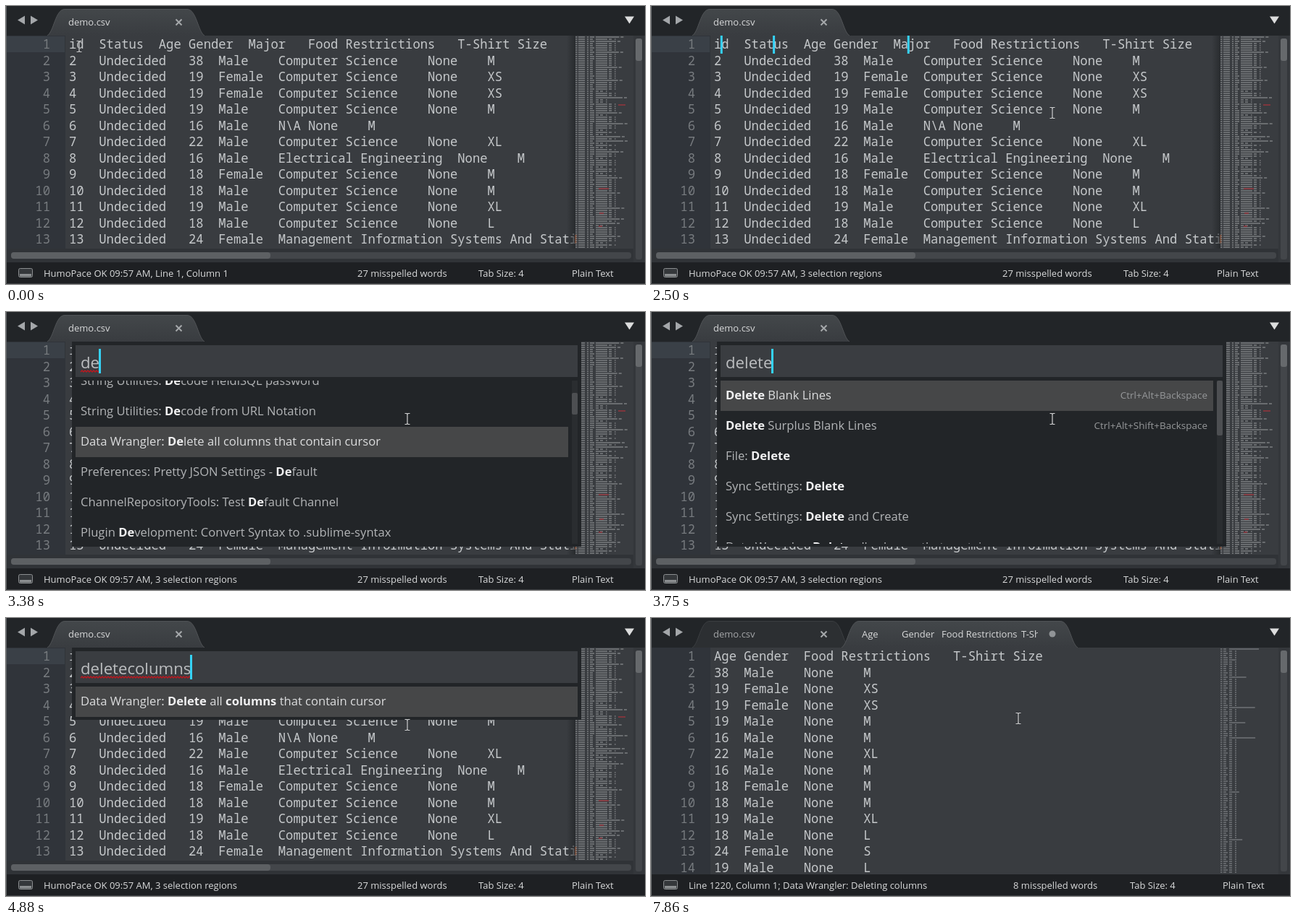
Animation of 882 by 385 pixels, one loop 7.99 s. Source, as an HTML page:

```html
<!DOCTYPE html>
<html lang="en">
<head>
<meta charset="utf-8">
<title>Deleting columns</title>
<style>
html, body { margin: 0; width: 100%; height: 100%; overflow: hidden; background: #1e2023; }
svg { display: block; width: 882px; height: 385px; }
text { white-space: pre; font: 13px "Open Sans", "Noto Sans", sans-serif; fill: #d9dadb; }
.code { font: 17.2px "Noto Sans Mono", "DejaVu Sans Mono", monospace; fill: #c5c8ca; }
.num { fill: #777b7f; text-anchor: end; }
.item { font-size: 16.6px; fill: #b3b5b7; }
.item.on { fill: #dcddde; }
.item tspan { font-weight: 700; fill: #f0f0f1; }
.query { font-size: 22.2px; fill: #bcbec0; }
.key { font-size: 13.5px; fill: #96989a; text-anchor: end; }
.caret { fill: #35d2f7; }
</style>
</head>
<body>
<svg viewBox="0 0 882 385">
  <defs>
    <linearGradient id="tabFill" x2="0" y2="1">
      <stop stop-color="#43474a"/><stop offset="1" stop-color="#393c40"/>
    </linearGradient>
    <linearGradient id="edge">
      <stop stop-color="#24272a" stop-opacity="0"/><stop offset="1" stop-color="#24272a" stop-opacity=".8"/>
    </linearGradient>
    <clipPath id="wideClip"><rect x="0" y="41" width="786" height="295"/></clipPath>
    <clipPath id="tallClip"><rect x="0" y="41" width="786" height="314"/></clipPath>
    <clipPath id="listClip"><rect x="91" y="95" width="703" height="226"/></clipPath>
    <clipPath id="labelClip"><rect x="285" y="5" width="249" height="34"/></clipPath>
  </defs>
  <rect width="882" height="385" fill="#222528"/>
  <rect y="41" width="882" height="314" fill="#393c40"/>
  <rect y="41" width="82" height="314" fill="#30343a"/>
  <g id="before"></g>
  <g id="after"></g>
  <g id="carets"></g>
  <path d="M26 13.5v12l-10-6zM34 13.5v12l10-6z" fill="#a4a7aa"/>
  <path d="M854 14.5h13l-6.500 10z" fill="#dcdddd"/>
  <rect y="355" width="882" height="30" fill="#1e2023"/>
  <rect x="17.500" y="363.500" width="19" height="12" rx="2" fill="#35383b" stroke="#8c8f91"/>
  <rect x="19" y="371" width="16" height="3.500" fill="#8c8f91"/>
  <text id="state" x="52" y="375"></text>
  <text id="spell" y="375"></text>
  <text id="tabs" y="375">Tab Size: 4</text>
  <text id="syntax" y="375">Plain Text</text>
  <g id="palette"></g>
  <g id="mouse" fill="none">
    <path d="M-3.500 -7.500H-1L0 -6.500L1 -7.500H3.500M0 -6.500V6.500M-3.500 7.500H-1L0 6.500L1 7.500H3.500" stroke="#26282b" stroke-width="2.600" opacity=".5"/>
    <path d="M-3.500 -7.500H-1L0 -6.500L1 -7.500H3.500M0 -6.500V6.500M-3.500 7.500H-1L0 6.500L1 7.500H3.500" stroke="#d2d3d4" stroke-width="1.200"/>
  </g>
  <path d="M.5 0V385" stroke="#5f6264"/>
  <path d="M0 384.500H882" stroke="#3c3f42"/>
</svg>
<script>
const $ = id => document.getElementById(id);
const LOOP = 7990, CELL = 10.32, LEFT = 87;

const CS = 'Computer Science';
const people = [
  [38, 'Male', CS, 'M'], [19, 'Female', CS, 'XS'], [19, 'Female', CS, 'XS'],
  [19, 'Male', CS, 'M'], [16, 'Male', 'N\\A', 'M'], [22, 'Male', CS, 'XL'],
  [16, 'Male', 'Electrical Engineering', 'M'], [18, 'Female', CS, 'M'],
  [18, 'Male', CS, 'M'], [19, 'Male', CS, 'XL'], [18, 'Male', CS, 'L'],
  [24, 'Female', 'Management Information Systems And Statistics', 'S'],
  [19, 'Male', CS, 'L']
];
const fullRows = [
  ['id', 'Status', 'Age', 'Gender', 'Major', 'Food Restrictions', 'T-Shirt Size'],
  ...people.map(([age, sex, major, size], i) => [i + 2, 'Undecided', age, sex, major, 'None', size])
];
const shortRows = [
  ['Age', 'Gender', 'Food Restrictions', 'T-Shirt Size'],
  ...people.map(([age, sex, , size]) => [age, sex, 'None', size])
];

const rect = (x, y, w, h, fill, more = '') =>
  `<rect x="${x}" y="${y}" width="${w}" height="${h}" fill="${fill}" ${more}/>`;
const text = (x, y, s, cls = '', more = '') =>
  `<text x="${x}" y="${y}" class="${cls}" ${more}>${s}</text>`;

// Tab stops every four cells.
const expand = cells => cells.reduce((line, cell) =>
  line && line.padEnd((Math.floor(line.length / 4) + 1) * 4) + cell || String(cell), '');

const codeLines = (rows, clip) => `<g clip-path="url(#${clip})">` + rows.map((row, i) => {
  const y = 59 + 22.5 * i;
  return text(61, y, i + 1, 'code num') + text(LEFT, y, expand(row), 'code');
}).join('') + '</g>';

function random(seed) {
  return () => (seed = seed * 16807 % 2147483647) / 2147483647;
}

function minimap(seed, bottom, wide) {
  const rnd = random(seed);
  let d = '';
  const word = (x, y, w) => d += `M${x} ${y}h${w.toFixed(1)}`;
  for (let y = 43; y < bottom; y += 3) {
    const long = rnd() < (wide ? .2 : .08);
    word(786, y, 2.5);
    if (wide) {
      word(790, y, 9);
      word(802, y, 2);
      word(806, y, rnd() < .4 ? 6 : 4);
      const major = rnd() < .15 ? 4 : long ? 25 + rnd() * 13 : 16;
      word(814, y, major);
      word(816 + major, y, 4);
      if (!long) word(824 + major, y, 1.5);
    } else {
      word(790, y, rnd() < .4 ? 6 : 4);
      word(798, y, long ? 10 + rnd() * 34 : 4);
      if (!long) word(806, y, 2);
    }
  }
  return `<path d="${d}" stroke="#85888b" stroke-width="2" opacity="${wide ? .65 : .55}"/>`;
}

function tab(x, end, active) {
  const d = `M${x} 41C${x + 9} 36 ${x + 11} 4.500 ${x + 24} 4.500H${end - 24}C${end - 11} 4.500 ${end - 9} 36 ${end} 41`;
  return `<path d="${d}" fill="${active ? 'url(#tabFill)' : '#2c2f32'}" stroke="${active ? '#505356' : '#3b3e41'}"/>`;
}

const fileTab = active => tab(57, 274, active) +
  text(86, 27, 'demo.csv', '', active ? '' : 'style="fill:#a5a7a9"') +
  '<path d="M234.500 18.500l8 8m0-8l-8 8" stroke="#a5a8aa" stroke-width="2"/>';

const scrollbar = rect(866, 41, 16, 314, '#34373b') +
  rect(869, 45, 9, 306, '#43464a', 'rx="3"') + rect(869, 45, 9, 31, '#66696c', 'rx="3"');

$('before').innerHTML = fileTab(true) + rect(1, 42, 80, 22, '#3a4047') +
  codeLines(fullRows, 'wideClip') + rect(774, 41, 12, 295, 'url(#edge)') +
  rect(785.5, 317, 2, 12, '#8a4b2e') + minimap(71, 336, true) +
  '<path d="M845 137h10m-37 116h14m-14 52h5m-4-18h6" stroke="#95353c" stroke-width="1.500"/>' +
  scrollbar + rect(1, 336, 865, 19, '#303337') +
  rect(7, 341, 856, 9, '#43464a', 'rx="4"') + rect(7, 341, 358, 9, '#5d6063', 'rx="4"');

$('after').innerHTML = fileTab(false) + tab(263, 589, true) +
  '<g clip-path="url(#labelClip)">' +
  [[291, 'Age'], [346, 'Gender'], [401, 'Food Restrictions'], [511, 'T-Shirt Size']]
    .map(([x, s]) => text(x, 27, s)).join('') +
  '</g><circle cx="554" cy="22" r="4.500" fill="#919497"/>' +
  codeLines(shortRows, 'tallClip') + minimap(29, 353, false) + scrollbar;

$('carets').innerHTML = [1, 8, 26].map(col =>
  rect((LEFT + col * CELL - 1.5).toFixed(1), 41, 3, 25, '', 'class="caret"')).join('');

// Asterisks mark the matched letters.
const wrangler = 'Data Wrangler: *Delete* all columns that contain cursor';
const plugin = 'Plugin *De*ve*l*opm*e*n*t*: *C*onv*e*rt Syntax t*o* .sublime-syntax';
const folder = 'File: New Fol*de*r R*el*ative *t*o Proj*ec*t R*o*ot';
const deletes = n => ['Delete Blank Lines|Ctrl+Alt+Backspace',
  'Delete Surplus Blank Lines|Ctrl+Alt+Shift+Backspace', 'File: Delete',
  'Sync Settings: Delete', 'Sync Settings: Delete and Create',
  'Data Wrangler: Delete all columns that contain cursor']
  .map(s => s.replace('Delete', w => `*${w.slice(0, n)}*${w.slice(n)}`));
const columns = n => wrangler.replace('columns', w => `*${w.slice(0, n)}*${w.slice(n)}`);

const palettes = [
  { at: 3000, query: '', thumb: [95, 30], items: ['Arithmetic',
    'Code Folding: Fold All', 'Code Folding: Unfold All', 'Convert Case: Lower Case',
    'Convert Case: Swap Case', 'Convert Case: Title Case'] },
  { at: 3380, query: 'de', wavy: true, top: 75, on: 2, thumb: [112, 30], items: [
    'String Utilities: *De*code HeidiSQL password', 'String Utilities: *De*code from URL Notation',
    'Data Wrangler: *De*lete all columns that contain cursor',
    'Preferences: Pretty JSON Settings - *De*fault',
    'ChannelRepositoryTools: Test *De*fault Channel',
    'Plugin *De*velopment: Convert Syntax to .sublime-syntax'] },
  { at: 3490, query: 'del', wavy: true, thumb: [95, 50], items: deletes(3) },
  { at: 3620, query: 'delet', wavy: true, thumb: [95, 70], items: deletes(5) },
  { at: 3750, query: 'delete', thumb: [95, 76], items: deletes(6) },
  { at: 3990, query: 'deletec', wavy: true, thumb: [95, 210], items: [
    'Sync Settings: *Delete* and *C*reate', columns(1), plugin.replace('t*o*', 'to'),
    folder, 'Sync Settings: *Delete* Lo*c*al Copy'] },
  { at: 4130, query: 'deleteco', wavy: true, thumb: [95, 126], items: [columns(2), plugin, folder] },
  { at: 4250, query: 'deletecol', wavy: true, thumb: [95, 84], items: [columns(3), plugin] },
  ...[[4500, 4], [4640, 5], [4760, 6], [4880, 7]].map(([at, n]) => (
    { at, query: 'delete' + 'columns'.slice(0, n), wavy: true, items: [columns(n)] })),
  { at: 6630 }
];

const mousePath = [
  [0, 101, 56], [130, 108, 57], [250, 101, 57], [380, 96, 55], [760, 100, 56],
  [880, 118, 58], [1010, 144, 56], [1130, 162, 54], [1250, 166, 53], [1500, 158, 52],
  [1620, 185, 62], [1750, 255, 74], [1870, 367, 66], [1990, 356, 54],
  [2250, 430, 92], [2360, 554, 149], [2500, 554, 148], [7370, 553, 150],
  [7490, 540, 130], [7610, 525, 121], [7740, 510, 128], [7860, 507, 139]
];

const statuses = [
  [0, 'Line 1, Column 1', 0], [640, 'Line 1, Column 2', 1],
  [1380, '2 selection regions', 2], [2130, '3 selection regions', 3], [6630, '', 0]
];

const latest = (steps, t, time = s => s[0]) => steps.filter(s => time(s) <= t).pop();

function drawPalette(p) {
  const box = $('palette');
  if (!p || !p.items) { box.innerHTML = ''; return; }
  const { query, items, thumb, top = 95, on = 0 } = p;
  const height = Math.min(items.length * 42, 226);
  const width = thumb ? 680 : 693;
  const rows = items.map((item, i) => {
    const [name, key = ''] = item.split('|'), y = top + 42 * i;
    const label = name.replace(/\*(.+?)\*/g, '<tspan>$1</tspan>');
    return (i === on ? rect(96, y, width, 42, '#464748') : '') +
      text(103, y + 26, label, i === on ? 'item on' : 'item') + text(768, y + 25, key, 'key');
  }).join('');
  box.innerHTML = rect(91, 41, 703, height + 58, '#222528') +
    rect(96, 46, 693, 44, '#3a3d41') +
    text(103, 78, query, 'query', 'id="query"') +
    `<g clip-path="url(#listClip)">${rows}</g>` +
    (thumb ? rect(781, 95, 8, height, '#2a2d30') +
      rect(781, thumb[0], 8, thumb[1], '#4d4f52', 'rx="2"') : '');
  const end = 103 + $('query').getComputedTextLength();
  let wave = 'M103 83';
  for (let x = 105, up = 1; x < end; x += 2, up = !up) wave += `L${x} ${up ? 81 : 83}`;
  box.insertAdjacentHTML('beforeend',
    (p.wavy ? `<path d="${wave}" fill="none" stroke="#c0161d" stroke-width="1.300"/>` : '') +
    rect(Math.round(end) - 1, 51, 3, 34, '', 'class="caret"'));
}

let shown = null;
function render(t) {
  const done = t >= 6630;
  const [, place, count] = latest(statuses, t);
  const [, mx, my] = latest(mousePath, t);
  $('before').style.display = done ? 'none' : '';
  $('after').style.display = done ? '' : 'none';
  [...$('carets').children].forEach((c, i) => c.style.display = i < count ? '' : 'none');
  $('state').textContent = done
    ? 'Line 1220, Column 1; Data Wrangler: Deleting columns'
    : 'HumoPace OK 09:57 AM, ' + place;
  $('spell').textContent = (done ? 8 : 27) + ' misspelled words';
  $('spell').setAttribute('x', done ? 500 : 485);
  $('tabs').setAttribute('x', done ? 661 : 652);
  $('syntax').setAttribute('x', done ? 789 : 781);
  $('mouse').setAttribute('transform', `translate(${mx} ${my})`);
  const p = latest(palettes, t, s => s.at);
  if (p !== shown) drawPalette(shown = p);
}

const start = performance.now();
function tick() {
  render((performance.now() - start) % LOOP);
  requestAnimationFrame(tick);
}
tick();
</script>
</body>
</html>
```
